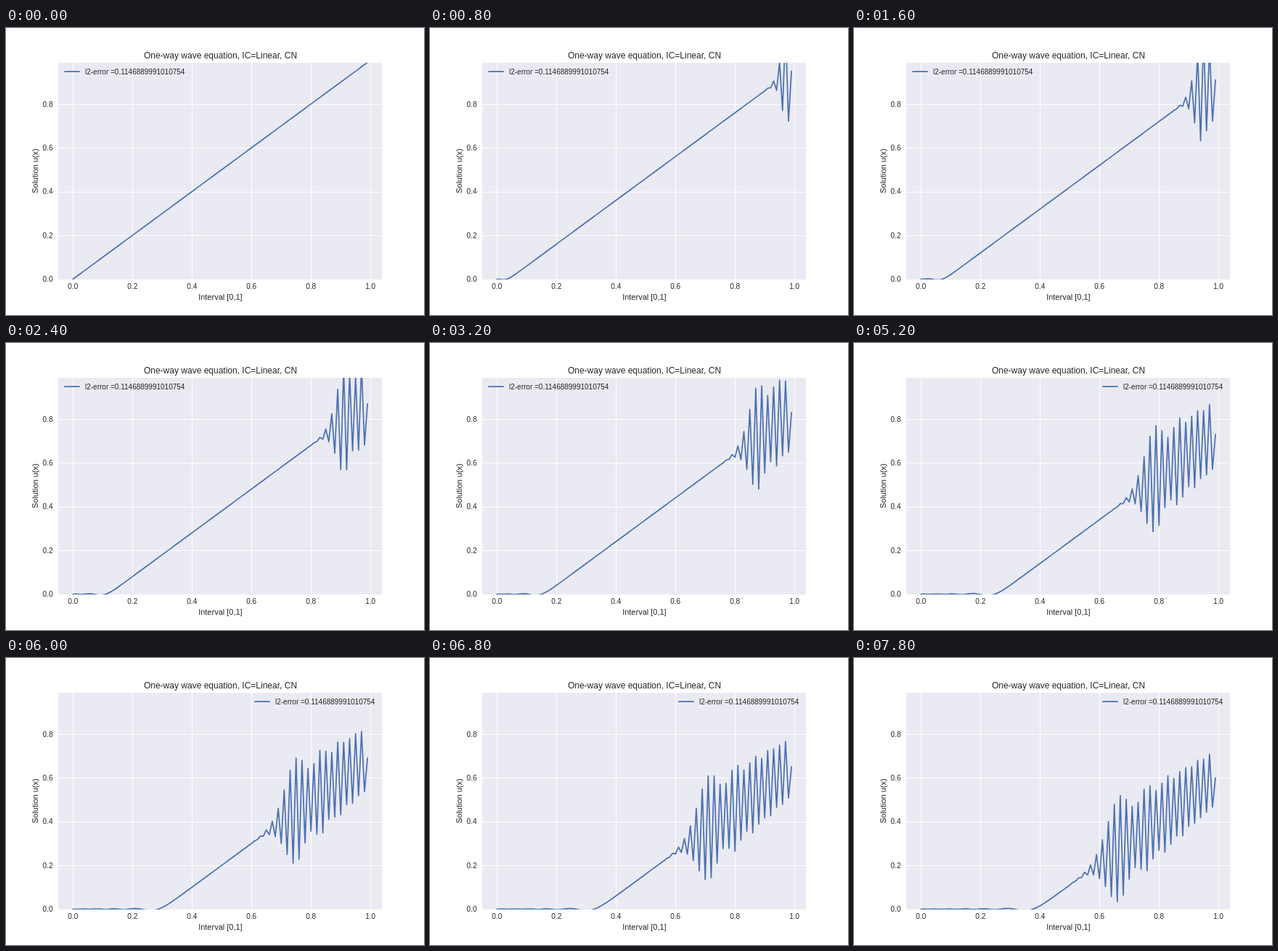
An HTML page for the animation above (8000 ms loop, 576 px wide and 396 px high).

```html
<!DOCTYPE html>
<html lang="en">
<head>
<meta charset="utf-8">
<title>One-way wave equation</title>
<style>
  html, body { margin: 0; width: 100%; height: 100%; overflow: hidden; background: #fff; }
  svg { display: block; width: 576px; height: 396px; }
  text { font: 10px "Liberation Sans", Arial, sans-serif; fill: #262626; }
  .mid { text-anchor: middle; }
  .end { text-anchor: end; }
  .label { font-size: 11px; }
  .title { font-size: 12px; }
  .curve { fill: none; stroke: #4c72b0; stroke-width: 1.75; stroke-linecap: round; stroke-linejoin: round; }
</style>
</head>
<body>
<svg viewBox="0 0 576 396">
  <clipPath id="axes"><rect x="72" y="48" width="446" height="299"/></clipPath>
  <rect x="72" y="48" width="446" height="299" fill="#eaeaf2"/>
  <path id="grid" stroke="#fff"/>
  <g id="ticks"></g>
  <text class="mid title" x="295.5" y="42">One-way wave equation, IC=Linear, CN</text>
  <text class="mid label" x="295.4" y="375">Interval [0,1]</text>
  <text class="mid label" transform="translate(44.3 197.2) rotate(-90)">Solution u(x)</text>
  <polyline id="solution" class="curve" clip-path="url(#axes)"/>
  <g id="legend">
    <path class="curve" d="M81 60.2H101"/>
    <text x="109" y="64">l2-error =0.1146889991010754</text>
  </g>
</svg>
<script>
const byId = id => document.getElementById(id);
const POINTS = 100, STEP = 0.01, FRAMES = 40, FRAME_MS = 200;
const LEGEND_MOVE_FRAME = 21;

const toX = x => 92.3 + 409.9 * x;
const toY = y => 346.5 - 302 * y;
const snap = v => Math.floor(v + 0.5) + 0.5;

// Grid lines and tick labels
let grid = "", ticks = "";
for (let i = 0; i <= 5; i++) {
  const value = i / 5, x = toX(value), y = toY(value), name = value.toFixed(1);
  grid += `M${snap(x)} 48V347`;
  ticks += `<text class="mid" x="${x}" y="360.3">${name}</text>`;
  if (i === 5) continue;
  if (i > 0) grid += `M72 ${snap(y)}H518`;
  ticks += `<text class="end" x="64.5" y="${y + 3.6}">${name}</text>`;
}
byId("grid").setAttribute("d", grid);
byId("ticks").innerHTML = ticks;

// One Crank-Nicolson step (dt = dx) with zero ghost cells, solved by
// the Thomas algorithm; both end values are then set to the exact solution.
function advance(u, time) {
  const c = 0.25, upper = [], rhs = [], next = [];
  for (let j = 0; j < POINTS; j++) {
    const right = u[j + 1] ?? 0, left = u[j - 1] ?? 0;
    const pivot = 1 + c * (upper[j - 1] ?? 0);
    upper[j] = c / pivot;
    rhs[j] = (u[j] - c * (right - left) + c * (rhs[j - 1] ?? 0)) / pivot;
  }
  for (let j = POINTS - 1; j >= 0; j--) next[j] = rhs[j] - upper[j] * (next[j + 1] ?? 0);
  next[0] = 0;
  next[POINTS - 1] = (POINTS - 1) * STEP - time;
  return next;
}

const states = [Array.from({ length: POINTS }, (_, j) => j * STEP)];
for (let n = 1; n < FRAMES; n++) states.push(advance(states[n - 1], n * STEP));
const curves = states.map(u =>
  u.map((v, j) => `${toX(j * STEP).toFixed(2)},${toY(v).toFixed(2)}`).join(" "));

let shown = -1;
function draw() {
  const frame = Math.floor(performance.now() / FRAME_MS) % FRAMES;
  if (frame !== shown) {
    shown = frame;
    byId("solution").setAttribute("points", curves[frame]);
    byId("legend").setAttribute("transform", `translate(${frame < LEGEND_MOVE_FRAME ? 0 : 262})`);
  }
  requestAnimationFrame(draw);
}
draw();
</script>
</body>
</html>
```
